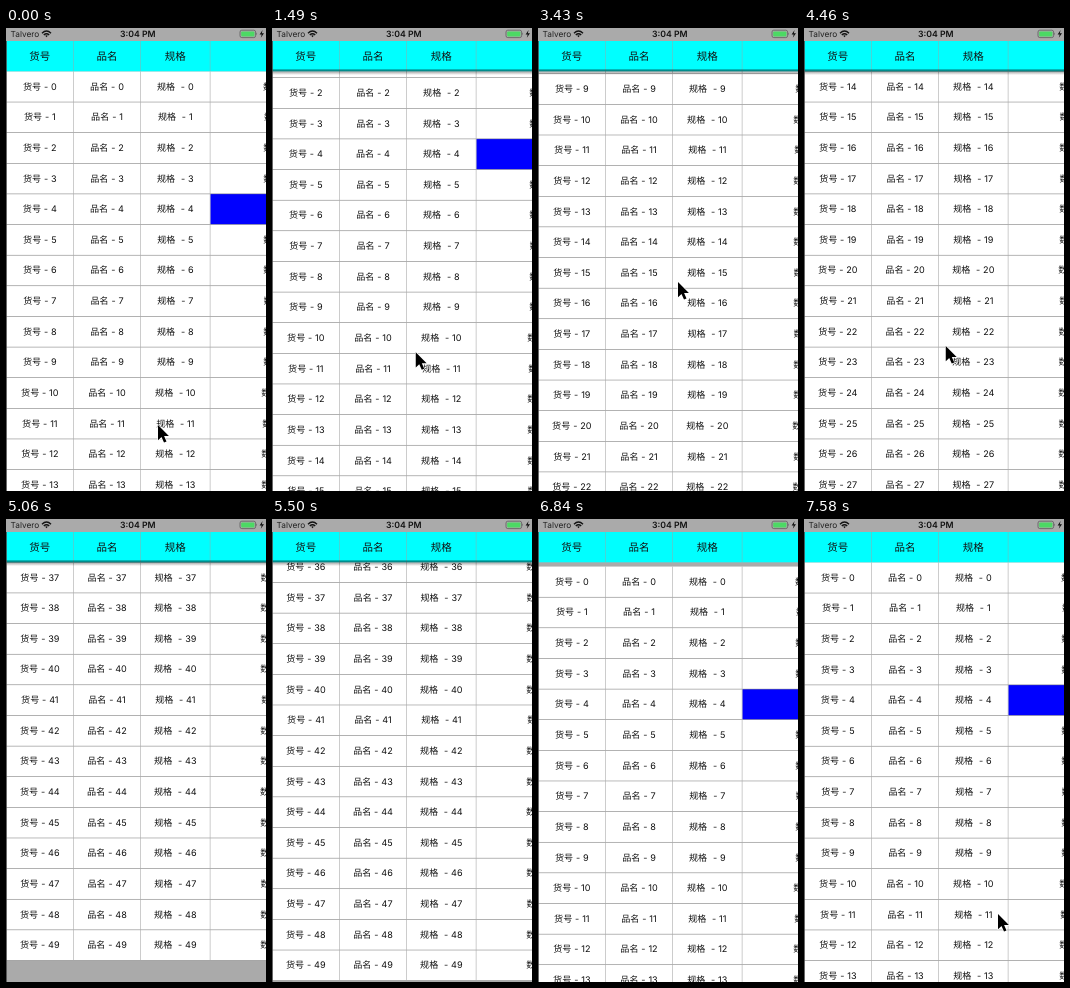
Write an HTML page that moves like this. It is 260 by 463 pixels and loops after 8 s.

```html
<!DOCTYPE html>
<html lang="zh-CN">
<head>
<meta charset="utf-8">
<title>Scrolling table</title>
<style>
  html, body { margin: 0; width: 100%; height: 100%; overflow: hidden; background: #aaa; }
  svg { display: block; width: 260px; height: 463px; }
  text { font-family: Inter, "Noto Sans CJK SC", "Noto Sans CJK", sans-serif; text-rendering: geometricPrecision; fill: #111; }
  .cell { font-size: 9.1px; word-spacing: .3px; text-anchor: middle; }
  .head { font-size: 10.5px; text-anchor: middle; }
</style>
</head>
<body>
<svg viewBox="0 0 260 463">
  <defs>
    <linearGradient id="fade" x2="0" y2="1">
      <stop offset="0" stop-opacity=".55"/>
      <stop offset="1" stop-opacity="0"/>
    </linearGradient>
  </defs>
  <rect width="260" height="463" fill="#aaa"/>
  <g id="rows"></g>
  <g id="header"><rect y="13" width="260" height="30.3" fill="#0ff"/></g>
  <rect id="shadow" y="41.5" width="260" height="5.5" fill="url(#fade)"/>
  <rect y="13" width=".8" height="450" fill="#444"/>

  <rect width="260" height="13" fill="#aaa"/>
  <text x="4.5" y="8.8" font-size="8.3" style="fill:#222">Talvero</text>
  <g fill="none" stroke="#111" stroke-width="1.4">
    <path d="M36 5.2Q40.5 1 45 5.2M37.8 7Q40.5 4.5 43.2 7"/>
    <path d="M39.2 7.8Q40.5 6.8 41.8 7.8L40.5 9.2Z" fill="#111" stroke="none"/>
  </g>
  <text x="131.7" y="9" font-size="8.7" font-weight="600" text-anchor="middle">3:04 PM</text>
  <rect x="234" y="2.2" width="15.6" height="7.4" rx="1.8" fill="none" stroke="#555" stroke-width=".7"/>
  <rect x="235.2" y="3.4" width="13.2" height="5" rx=".9" fill="#4cd964"/>
  <path d="M250.4 4.6q1.3 1.3 0 2.6z" fill="#555"/>
  <path d="M256.6 2L253.6 6.4H255.7L254.8 9.8L258 5.2H255.8Z" fill="#111"/>

  <path id="cursor" d="M0 0V15.2L3.5 12L6 17.6L8.5 16.5L6.1 11.1H10.9Z" stroke="#fff" stroke-width="1.2" paint-order="stroke" stroke-linejoin="round"/>
</svg>
<script>
const PITCH = 30.63, TOP = 43.4, COUNT = 50, LOOP = 8000;
const START = 1340, TICK = 148.2;
const END = COUNT * PITCH - (463 - TOP);
const columns = [
  { name: "货号", x: 33.8, gap: " " },
  { name: "品名", x: 101, gap: " " },
  { name: "规格", x: 169.3, gap: "\u00a0 " },
  { name: "数量", x: 274, gap: " " }
];
const dividers = [67.3, 134.3, 203.8];

const linear = p => p;
const easeIn = p => p * p;
const easeOut = p => 1 - (1 - p) ** 2;

// Times are in ticks; each move starts where the one before it ended.
const move = (from, to, ease, ...target) => ({ from, to, ease, target });

const scrollMoves = [
  move(0, 6, easeOut, 99),
  move(8, 10, easeIn, 207),
  move(14, 17, linear, 406),
  move(21, 22, linear, 14 * PITCH),
  move(22, 26, easeOut, END + 21.5),
  move(26, 30, easeOut, END),
  move(32, 34, easeIn, 779),
  move(34, 37, easeOut, -6),
  move(37, 43, easeOut, 0)
];
const cursorMoves = [
  move(0, 4, easeOut, 141, 300),
  move(4, 7, linear, 139, 322),
  move(8, 10, easeIn, 138, 242),
  move(11, 13, linear, 139, 322),
  move(14, 17, linear, 142, 118),
  move(18, 20, linear, 141, 341),
  move(21, 23, easeIn, 144, 249),
  move(23, 24, linear, 240, 470),
  move(40, 43, easeOut, 194, 395)
];

function valueAt(moves, origin, tick) {
  let value = origin;
  for (const { from, to, ease, target } of moves) {
    if (tick <= from) break;
    const p = ease(Math.min(1, (tick - from) / (to - from)));
    value = value.map((v, i) => v + (target[i] - v) * p);
  }
  return value;
}

const $ = id => document.getElementById(id);

function add(parent, tag, attrs, content = "") {
  const el = document.createElementNS("http://www.w3.org/2000/svg", tag);
  for (const key in attrs) el.setAttribute(key, attrs[key]);
  el.textContent = content;
  parent.append(el);
}

const rect = (parent, x, y, width, height, fill) =>
  add(parent, "rect", { x, y, width, height, fill });

const label = (parent, x, y, kind, content) =>
  add(parent, "text", { x, y, class: kind }, content);

const rows = $("rows"), header = $("header"), shadow = $("shadow"), cursor = $("cursor");

function buildRow(i) {
  const y = TOP + i * PITCH, marked = i === 4;
  rect(rows, 0, y, 260, PITCH, "#fff");
  if (marked) rect(rows, 204.3, y, 56, PITCH, "#00f");
  columns.forEach((c, k) => {
    if (!marked || k < 3) label(rows, c.x, y + 18.3, "cell", `${c.name}${c.gap}- ${i}`);
  });
}

for (let i = 0; i < COUNT; i++) buildRow(i);
for (let i = 1; i <= COUNT; i++) rect(rows, 0, TOP + i * PITCH - .25, 260, .5, "#777");
for (const x of dividers) {
  rect(rows, x, TOP, .6, COUNT * PITCH, "#aaa");
  rect(header, x, 13, .6, 30, "#7bb");
}
columns.forEach(c => label(header, c.x, 32, "head", c.name));

function draw(time) {
  const tick = Math.max(0, Math.floor((time % LOOP - START) / TICK) + 1);
  const [offset] = valueAt(scrollMoves, [0], tick);
  const [x, y] = valueAt(cursorMoves, [152, 397], tick);
  rows.setAttribute("transform", `translate(0 ${-offset})`);
  cursor.setAttribute("transform", `translate(${x} ${y})`);
  shadow.style.display = offset > 0 ? "" : "none";
}

const begin = performance.now();
function loop() {
  draw(performance.now() - begin);
  requestAnimationFrame(loop);
}
loop();
</script>
</body>
</html>
```
